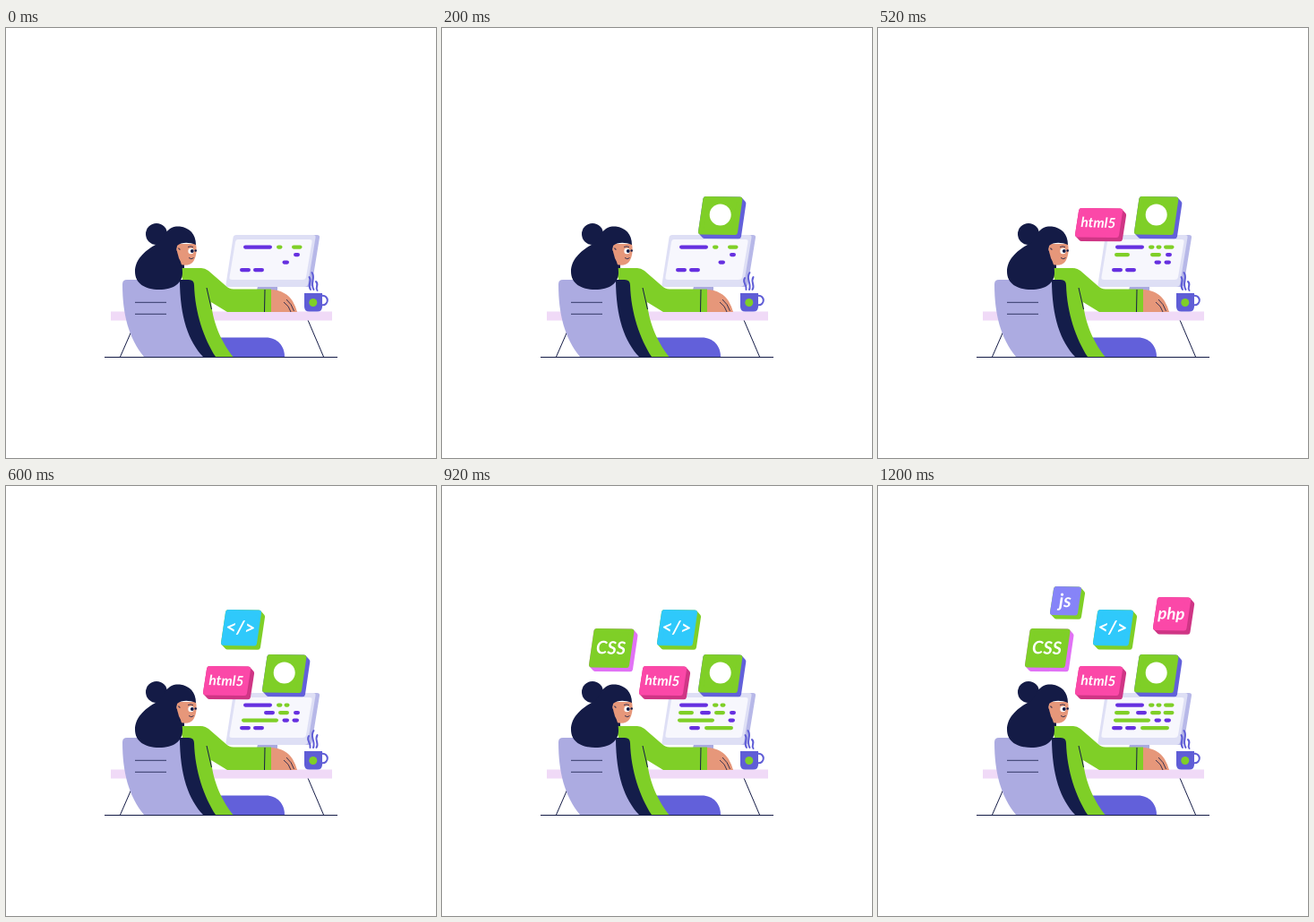
Animation of 480 by 480 pixels, one loop 1.4 s. Source, as an HTML page:

```html
<!DOCTYPE html>
<html lang="en">
<head>
<meta charset="utf-8">
<style>
html, body { margin: 0; width: 100%; height: 100%; overflow: hidden; background: #fff; }
svg { display: block; width: 100vw; height: 100vh; }
text { font-family: Lato, "Open Sans", sans-serif; font-weight: 700; font-style: italic; fill: #fff; text-anchor: middle; }
.line { fill: none; stroke: #141b46; stroke-width: 1; }
.thin { stroke-width: .8; }
.steam { fill: none; stroke: #5f5dd6; stroke-width: 2; stroke-linecap: round; }
</style>
</head>
<body>
<svg viewBox="0 0 480 480">
  <!-- desk -->
  <path class="line" d="M145 327L127.500 367M337 326L354.500 367"/>
  <path fill="#f0daf7" d="M117 316.500H364V326.500H117Z"/>

  <!-- monitor -->
  <path fill="#a9a9df" d="M281 288H303V293H280Z"/>
  <path fill="#b7b8e8" d="M340 231H347Q350.500 231 350 234L341.500 286Q341 289 338 289H325Z"/>
  <path fill="#dedff5" d="M257 231H343Q346 231 345.500 234L337 286Q336.500 289 333 289H248Q245 289 245.500 286L253.500 234Q254 231 257 231Z"/>
  <path fill="#f7f7fd" d="M259 236H339Q342 236 341.500 239L335 278Q334.500 281 331 281H252Q249 281 249.500 278L256 239Q256.500 236 259 236Z"/>
  <g id="code"></g>

  <!-- mug -->
  <circle cx="353.500" cy="304" r="5.300" fill="none" stroke="#5f5dd6" stroke-width="2"/>
  <path fill="#5f5dd6" d="M333 296H353V311Q353 316.500 347.500 316.500H338.500Q333 316.500 333 311Z"/>
  <circle cx="342.800" cy="306.500" r="4.500" fill="#7fcf27"/>
  <path class="steam" d="M338.500 278C342 283 336 286 340 292M341.500 273C346 280 339 284 343.500 292M346 283C350 287 344.500 289 347.500 293"/>
  <path class="steam" d="M338 279C334.500 284 341 287 339.500 292M343.500 273C338.500 280 346 285 343 292M347.500 278C344 284 350 287 346.500 292"/>

  <!-- person and chair -->
  <path fill="#6260da" d="M236 345.500H290C303 345.500 311 355 311 367H240Z"/>
  <path fill="#e6977a" d="M295 292C307 292 316 298 320 305Q323 310 325 317H295Z"/>
  <path class="line thin" d="M310 306Q316 310 318 317M313 303Q319 308 321.500 316"/>
  <path fill="#7fcf27" d="M193 268H218Q222 268 226 271L245 287.500Q249 291.500 254 291.500H296V317H247L229 306C231 332 243 354 253.500 367H225Z"/>
  <path class="line" d="M224 290L229.500 314M289 292L288.500 317"/>
  <path fill="#141d4a" d="M185 281H204Q210 281 210 287C211 318 221 347 234 367H190Z"/>
  <path fill="#acabe1" d="M135 281H194C194 323 204 350 220 367H154C137 346 130 320 130 286Q130 281 135 281Z"/>
  <path class="line thin" d="M144 306.300H179M144 319.300H179"/>
  <path class="line" d="M110 367.500H370"/>

  <path fill="#141b46" d="M192 260H199V268H192Z"/>
  <path fill="#e6977a" d="M190 241H212C213.500 249 212 256 209.500 260C207 265 199 266 192 263Z"/>
  <circle cx="168" cy="230" r="12" fill="#141b46"/>
  <path fill="#141b46" d="M178 229C183 222 189 221 194 221.500C205 223 212 230 212 242C204 239 196 239 191 243C190 249 192 252 193 257C196 262 197 267 197 273C197 285 187 292 171 292C155 292 144 285 144 272C144 258 156 247 171 240Z"/>
  <circle cx="193" cy="247" r="2.700" fill="#e6977a"/>
  <circle cx="206.500" cy="249" r="3.200" fill="#fff"/>
  <circle cx="207.800" cy="249" r="1.900" fill="#141b46"/>
  <circle cx="211.700" cy="248.500" r="1.200" fill="#141b46"/>
  <path class="line thin" d="M203 244.500Q206 243 209 244.500M204 256.500Q207 259 209.500 256.500M192 246Q194.500 245.500 194 248"/>

  <g id="tiles"></g>
</svg>
<script>
const STEP = 200, STEPS = 7;
const GREEN = "#7fcf27", PURPLE = "#6630e0", PINK = "#fb48a8", ROSE = "#cf3585";
const get = id => document.getElementById(id);

// row, left, right, colour, steps in which the bar shows
const bars = [
  [0, 265, 297, PURPLE, "0123456"],
  [0, 302, 308.5, GREEN, "012346"],
  [0, 310.5, 316.5, GREEN, "23456"],
  [0, 319, 330.5, GREEN, "01256"],
  [1, 264, 281, GREEN, "246"],
  [1, 288, 300, PURPLE, "3456"],
  [1, 304, 316, GREEN, "23456"],
  [1, 321, 328, PURPLE, "012345"],
  [1, 318.5, 330.5, GREEN, "6"],
  [2, 263, 304, GREEN, "3456"],
  [2, 308.5, 316, PURPLE, "012356"],
  [2, 319.5, 327, PURPLE, "23456"],
  [3, 261, 273, PURPLE, "012356"],
  [3, 276, 288, PURPLE, "0123456"],
  [3, 293, 325, GREEN, "46"]
];

// left, top, width, height, face, side, label, font size
const tiles = [
  [286, 188, 44, 43, GREEN, "#6260da"],
  [220, 201, 49, 33, PINK, ROSE, "html5", 15.5],
  [240, 138, 40, 40.5, "#2fc9fb", GREEN, "</>", 21],
  [164, 159, 45, 44, GREEN, "#e172f5", "CSS", 20],
  [307, 124, 37.5, 37.5, PINK, ROSE, "php", 18.5],
  [192, 112, 31, 32.5, "#8684f8", GREEN, "js", 21]
];

function add(parent, tag, attrs, content = "") {
  const el = document.createElementNS("http://www.w3.org/2000/svg", tag);
  for (const key in attrs) el.setAttribute(key, attrs[key]);
  el.textContent = content;
  return parent.appendChild(el);
}

function shape(parent, points, color) {
  add(parent, "polygon", {
    points: points.join(" "), fill: color, stroke: color,
    "stroke-width": 6, "stroke-linejoin": "round"
  });
}

function makeTile([x, y, w, h, face, side, label, size]) {
  const g = add(get("tiles"), "g", {});
  const lean = h * 0.125;
  const tl = [x + lean + 3, y + 3], tr = [x + lean + w - 3, y + 3.4];
  const br = [x + w - 3, y + h - 3], bl = [x + 3, y + h - 3.4];
  const push = ([px, py]) => [px + 4, py + 4.3];
  shape(g, [tl, tr, push(tr), push(br), push(bl), bl], side);
  shape(g, [tl, tr, br, bl], face);
  const cx = x + (w + lean) / 2, cy = y + h / 2;
  if (label) {
    add(g, "text", {
      x: cx - 0.7, y: cy + size * 0.33, "font-size": size,
      transform: `rotate(2 ${cx} ${cy})`
    }, label);
  } else {
    add(g, "circle", { cx, cy: cy - 1, r: 12, fill: "#fff" });
  }
  return g;
}

const barEls = bars.map(([row, x, end, fill]) => add(get("code"), "rect", {
  x, y: 242.5 + row * 8.5, width: end - x, height: 4.2, rx: 2.1, fill
}));
const tileEls = tiles.map(makeTile);
const steamEls = document.querySelectorAll(".steam");
const show = (el, on) => el.style.display = on ? "" : "none";

function draw() {
  const step = Math.floor(performance.now() / STEP) % STEPS;
  barEls.forEach((el, i) => show(el, bars[i][4].includes(step)));
  tileEls.forEach((el, i) => show(el, step > i));
  steamEls.forEach((el, i) => show(el, step % 2 === i));
  requestAnimationFrame(draw);
}
draw();
</script>
</body>
</html>
```
